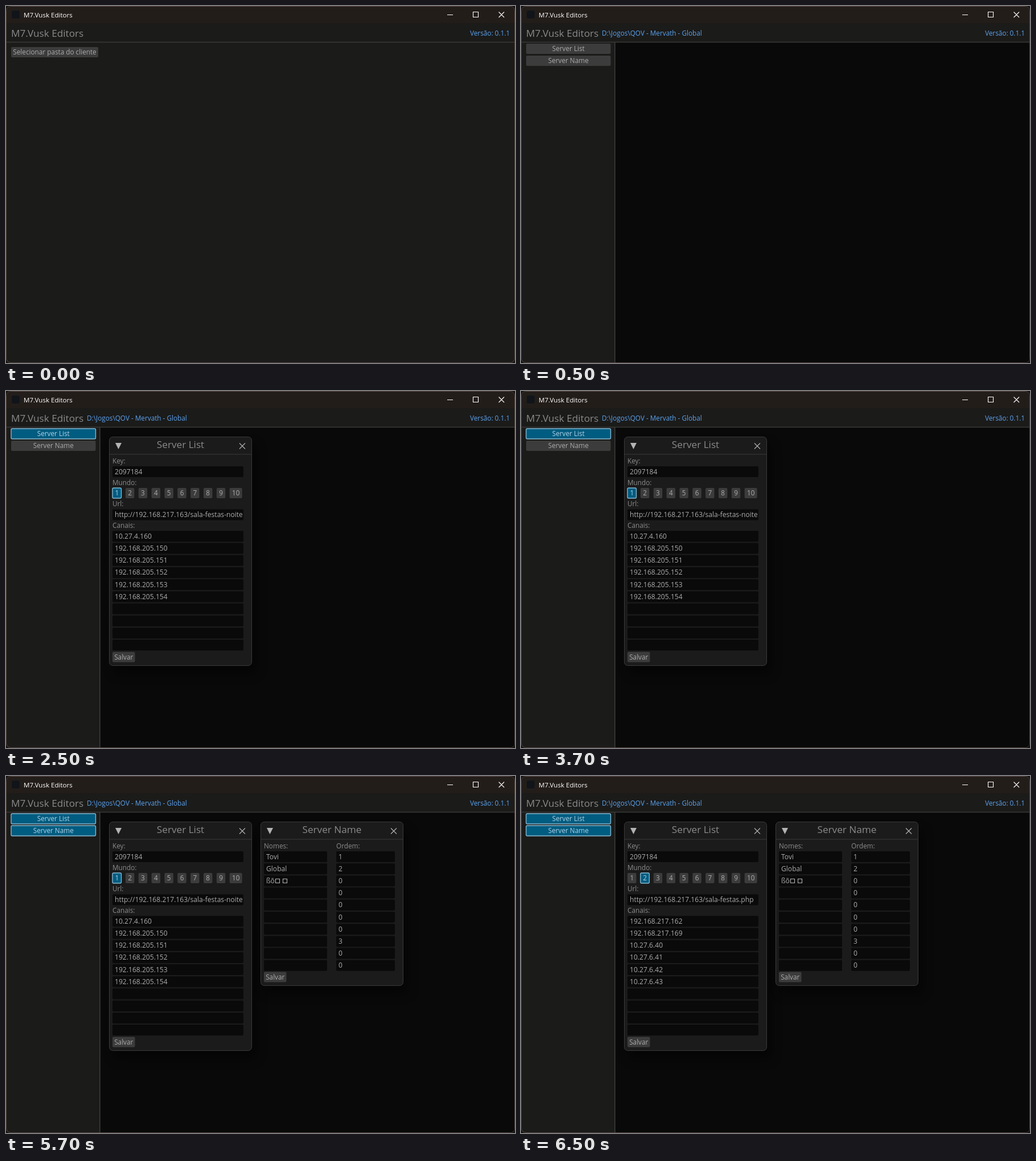
An HTML page for the animation above (8000 ms loop, 894 by 626 pixels).

```html
<!DOCTYPE html>
<html lang="pt">
<head>
<meta charset="utf-8">
<title>Editors</title>
<style>
  html, body { margin: 0; width: 100%; height: 100%; overflow: hidden; background: #1b1b1b; }
  svg { display: block; width: 894px; height: 626px; }
  text { font: 11.75px "Open Sans", "Noto Sans", sans-serif; fill: #acacac; white-space: pre; }
  .label { fill: #8c8c8c; }
  .head { font-size: 17.2px; fill: #8a8a8a; }
  .field { font-size: 12.1px; }
  .link { fill: #5ba2ee; }
  .bar { font-size: 11.6px; fill: #fff; }
  .btn { fill: #3c3c3c; }
  .on .btn { fill: #005c80; stroke: #86b9d2; stroke-width: 1.4; }
  .on text { fill: #b4d3e6; }
  .win { fill: #1b1b1b; stroke: #3a3a3a; filter: drop-shadow(8px 14px 9px rgba(0, 0, 0, .45)); }
  .icon { fill: none; stroke: #b4b4b4; stroke-width: 1.1; }
</style>
</head>
<body>
<svg id="stage" viewBox="0 0 894 626"></svg>
<script>
const APP = "M7.Vusk Editors";
const STEP = 21.2;
const LOOP = 8000;

const rect = (x, y, w, h, fill, r = 0) =>
  `<rect x="${x}" y="${y}" width="${w}" height="${h}" rx="${r}" fill="${fill}"/>`;
const text = (x, y, s, cls = "", anchor = "start") =>
  `<text x="${x}" y="${y}" class="${cls}" text-anchor="${anchor}">${s}</text>`;
const path = (d, attrs = 'class="icon"') => `<path d="${d}" ${attrs}/>`;
const group = (id, body) => `<g id="${id}">${body}</g>`;

const button = (id, x, y, w, s) => group(id,
  `<rect class="btn" x="${x}" y="${y}" width="${w}" height="18" rx="2"/>` +
  text(x + w / 2, y + 13, s, "", "middle"));

// Text field whose content is cut at its right edge
const field = (x, y, w, s = "") =>
  rect(x, y, w, 19, "#0a0a0a", 2) +
  `<svg x="${x}" y="${y}" width="${w - 2}" height="19">${text(4, 13.6, s, "field")}</svg>`;

const column = (x, y, w, items) =>
  Array.from({ length: 10 }, (_, i) => field(x, y + i * STEP, w, items[i])).join("");

const panel = (x, h, title) =>
  `<rect class="win" x="${x + .5}" y="80.5" width="250" height="${h}" rx="6"/>` +
  path(`M${x + 1} 111h249`, 'stroke="#3a3a3a"') +
  path(`M${x + 11} 91h11l-5.5 11z`, 'fill="#b4b4b4"') +
  path(`M${x + 229} 91.5l10 10m0-10l-10 10`) +
  text(x + 125.5, 100, title, "head", "middle");

const span = (prefix, from, n) => Array.from({ length: n }, (_, i) => prefix + (from + i));

const HOST = "http://192.168.217.163/sala-festas";
const worlds = [
  { url: HOST + "-noite.php", hosts: ["10.27.4.160", ...span("192.168.205.", 150, 5)] },
  { url: HOST + ".php", hosts: ["192.168.217.162", "192.168.217.169", ...span("10.27.6.", 40, 4)] }
];

const worldButtons = () => span("", 1, 10).map((n, i) =>
  button("pick" + n, +(187 + i * 22.85).toFixed(2), 170, i < 9 ? 15.5 : 22, n)).join("");

const worldFields = ({ url, hosts }, i) => group("world" + (i + 1),
  field(187, 207.5, 230, url) + column(187, 245.3, 230, hosts));

const listWindow = panel(181, 401, "Server List") +
  text(187, 127, "Key:", "label") + field(187, 132, 230, "2097184") +
  text(187, 164.5, "Mundo:", "label") + worldButtons() +
  text(187, 202, "Url:", "label") +
  text(187, 240, "Canais:", "label") +
  worlds.map(worldFields).join("") +
  button("saveList", 187, 457.5, 39.5, "Salvar");

const nameWindow = panel(447, 287, "Server Name") +
  text(453, 127, "Nomes:", "label") + column(453, 132, 111, ["Tovi", "Global", "ßõ"]) +
  path("M473.5 180.5h7v7h-7zM486.5 180.5h7v7h-7z") +
  text(580, 127, "Ordem:", "label") + column(580, 132, 103, [1, 2, 0, 0, 0, 0, 0, 3, 0, 0]) +
  button("saveName", 453, 343.5, 39.5, "Salvar");

const frame =
  rect(0, 0, 894, 626, "#171310") +
  '<rect x=".5" y=".5" width="893" height="625" rx="8" fill="#1b1b1a" stroke="#574941"/>' +
  path("M1 30V8.5Q1 1 8.5 1H885.5Q893 1 893 8.5V30z", 'fill="#231d1a"') +
  rect(10, 8, 14, 14, "#11151a", 3) +
  text(31, 19.5, APP, "bar") +
  path("M775 15.5h10M820.5 10.5h9v9h-9zM865.5 10.5l9.5 9.5m0-9.5l-9.5 9.5",
    'fill="none" stroke="#fff" stroke-width="1.1"') +
  text(9, 53.5, APP, "head") +
  text(885, 51.5, "Versão: 0.1.1", "link", "end");

const workspace =
  path("M166 64H893V617.5Q893 625 885.5 625H166z", 'fill="#090909"') +
  rect(164, 64, 1.5, 561, "#383838") +
  text(142, 51.5, "D:\\Jogos\\QOV - Mervath - Global", "link") +
  button("openList", 9, 66, 148.5, "Server List") +
  button("openName", 9, 87, 148.5, "Server Name");

const stage = document.getElementById("stage");
stage.innerHTML = frame +
  group("start", button("choose", 9, 72, 153, "Selecionar pasta do cliente")) +
  group("main", workspace) +
  rect(1, 62.7, 892, 1.5, "#383838") +
  group("list", listWindow) +
  group("names", nameWindow);

const el = id => document.getElementById(id);
const show = (id, on) => { el(id).style.display = on ? "" : "none"; };
const mark = (id, on) => el(id).classList.toggle("on", on);

function draw(now) {
  const t = now % LOOP;
  const list = t >= 2500, names = t >= 4500, second = t >= 6500;
  show("start", t < 500);
  show("main", t >= 500);
  show("list", list);
  show("names", names);
  show("world1", !second);
  show("world2", second);
  mark("openList", list);
  mark("openName", names);
  mark("pick1", !second);
  mark("pick2", second);
}

const begin = performance.now();
function tick() {
  draw(performance.now() - begin);
  requestAnimationFrame(tick);
}
tick();
</script>
</body>
</html>
```
